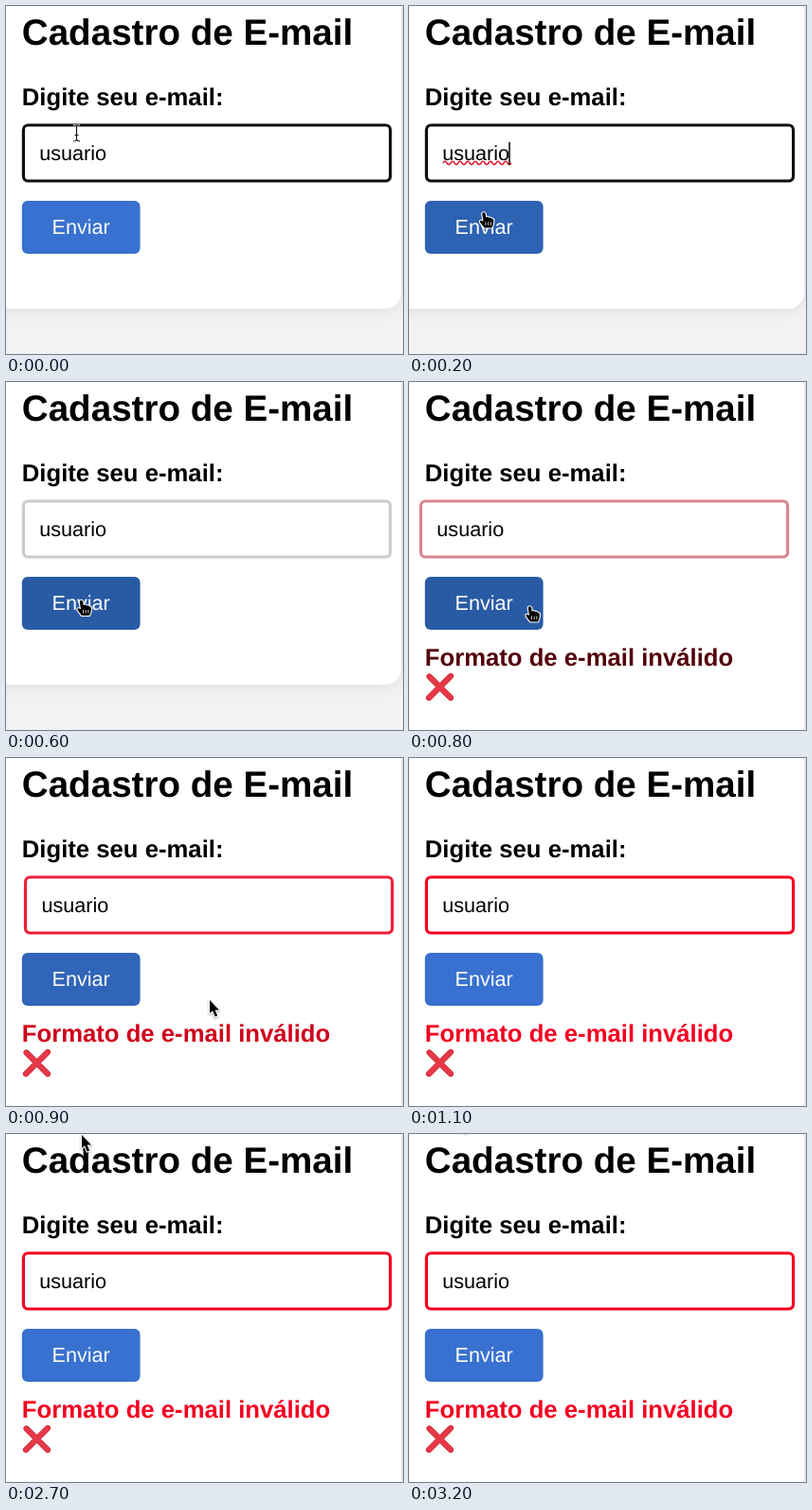
An HTML page for the animation above (3900 ms loop, 419x368 px).

```html
<!DOCTYPE html>
<html lang="pt-BR">
<head>
<meta charset="utf-8">
<title>Cadastro de E-mail</title>
<style>
  html, body { margin: 0; width: 100%; height: 100%; overflow: hidden; background: #f2f2f2; }
  svg { display: block; overflow: hidden; }
  text {
    font-family: "Liberation Sans", Arial, sans-serif; font-size: 21.6px;
    text-rendering: geometricPrecision;
  }
  .bold { font-weight: bold; font-size: 25.7px; }
  #card { filter: drop-shadow(0 0 8px rgba(0, 0, 0, .1)); }
  #cursor path { stroke: #fff; stroke-width: 2.2; stroke-linejoin: round; paint-order: stroke; }
  #cursor .line { fill: none; stroke-width: .8; }
  #arrow { filter: drop-shadow(0 1px 1px rgba(0, 0, 0, .35)); }
</style>
</head>
<body>
<svg width="419" height="368" viewBox="0 0 419 368">
  <rect id="card" x="-40" y="-40" width="457" height="360" rx="16" fill="#fff"/>

  <text class="bold" x="16.8" y="41" style="font-size:38.6px">Cadastro de E-mail</text>
  <text class="bold" x="16.8" y="105">Digite seu e-mail:</text>

  <g id="field">
    <rect id="border" x="18.4" y="126" width="387.2" height="59" rx="5" fill="#fff" stroke-width="3.2"/>
    <text x="35.3" y="163">usuario</text>
    <g id="edit" fill="none">
      <path id="wave" stroke="#e0182d" stroke-width="1.5"/>
      <path d="M106 144V168" stroke="#000" stroke-width="1.5"/>
    </g>
  </g>

  <rect id="button" x="16.8" y="206" width="124.8" height="56" rx="6"/>
  <text x="48.6" y="241.3" fill="#fff">Enviar</text>

  <g id="error">
    <text id="message" class="bold" x="16.8" y="300">Formato de e-mail inválido</text>
    <g fill="none" stroke-linecap="round">
      <path d="M21.5 311.5L44 334M44 311L21 334" stroke="#cf2a38" stroke-width="6.2"/>
      <path d="M21.5 311.5L44 334M44 311L21 334" stroke="#e63847" stroke-width="4.6"/>
    </g>
  </g>

  <g id="cursor">
    <g id="beam">
      <path d="M-3.5-8.5Q0-8.5 0-6Q0-8.5 3.5-8.5M0-6V6M-3.5 8.5Q0 8.5 0 6Q0 8.5 3.5 8.5" fill="none"/>
      <path d="M-3.5-8.5Q0-8.5 0-6Q0-8.5 3.5-8.5M0-6V6M-3.5 8.5Q0 8.5 0 6Q0 8.5 3.5 8.5M-2 2H2" fill="none" style="stroke:#111;stroke-width:1.1"/>
    </g>
    <g id="hand">
      <path d="M-1.8 1.5Q0-1 1.6 1.5L2.2 5.5Q4.6 4.5 5.4 6Q7.8 5.4 8.4 7Q10.4 6.8 10.4 9Q10.4 13.5 8.5 16.5H.5L-4 10.8Q-4.6 8.3-2 9L-.5 10Z"/>
      <path class="line" d="M2 10.5V14M4.7 10.5V14M7.3 10.5V14"/>
    </g>
    <path id="arrow" d="M0 0V14L3.1 11.2L5.6 17.5L8.2 16.4L5.6 10.4H10Z"/>
  </g>
</svg>
<script>
const $ = id => document.getElementById(id);
const LOOP = 3900, STEP = 100;

// Pointer stops: time, shape, x, y
const stops = [
  [0, 'beam', 74.5, 134.5], [100, 'beam', 77, 165],
  [200, 'hand', 79, 218], [300, 'hand', 79.5, 225], [400, 'hand', 79.5, 227],
  [500, 'hand', 79.5, 229], [600, 'hand', 79.5, 230.5], [800, 'hand', 127.5, 237],
  [900, 'arrow', 215, 256], [1000, 'arrow', 340, 272], [1100],
  [2200, 'arrow', 237, 56.5], [2300],
  [2600, 'arrow', 106, -6], [2700, 'arrow', 80, 1], [2800, 'arrow', 48, 3],
  [2900, 'arrow', 26, -2], [3000, 'arrow', 36, -9],
  [3100, 'arrow', 54, -17], [3200, 'arrow', 53.5, -19]
];

const clamp = v => Math.max(0, Math.min(1, v));
const mix = (a, b, k) => `rgb(${a.map((v, i) => Math.round(v + (b[i] - v) * k))})`;

// CSS "ease": cubic-bezier(.25, .1, .25, 1)
function ease(x) {
  let lo = 0, hi = 1;
  for (let i = 0; i < 20; i++) {
    const u = (lo + hi) / 2;
    if (.75 * u * (1 - u) + u ** 3 < x) lo = u; else hi = u;
  }
  return .3 * lo * (1 - lo) ** 2 + 3 * lo * lo * (1 - lo) + lo ** 3;
}

function shake(p) {
  const offsets = [0, -6, 6, -6, 0, 0];
  const i = Math.floor(p * 4);
  return offsets[i] + (offsets[i + 1] - offsets[i]) * ease(p * 4 - i);
}

const show = (id, on) => $(id).style.display = on ? '' : 'none';

function draw(t) {
  const failed = t >= 800;
  const p = failed ? clamp((t - 734) / 300) : 0;
  const k = ease(p);
  const red = [243, 0, 32], black = [0, 0, 0];

  $('card').setAttribute('height', failed ? 460 : 360);
  $('field').setAttribute('transform', `translate(${shake(p)})`);
  $('border').setAttribute('stroke',
    t < 500 ? '#101012' : mix([204, 204, 204], red, k));
  show('edit', t >= 200 && t < 500);

  const hover = t < 850 ? ease(clamp((t - 130) / 170)) : 1 - ease(clamp((t - 830) / 250));
  $('button').setAttribute('fill', mix([56, 113, 207], [41, 91, 165], hover));

  show('error', failed);
  $('message').setAttribute('fill', mix(black, red, k));

  const [, shape, x = 0, y = 0] = stops.findLast(s => s[0] <= t);
  for (const id of ['beam', 'hand', 'arrow']) show(id, id === shape);
  $('cursor').setAttribute('transform', `translate(${x} ${y})`);
}

$('wave').setAttribute('d', 'M36 166' + 'q2-3.4 4 0t4 0'.repeat(9));

function tick(now) {
  draw(Math.floor(now % LOOP / STEP) * STEP);
  requestAnimationFrame(tick);
}
draw(0);
requestAnimationFrame(tick);
</script>
</body>
</html>
```
